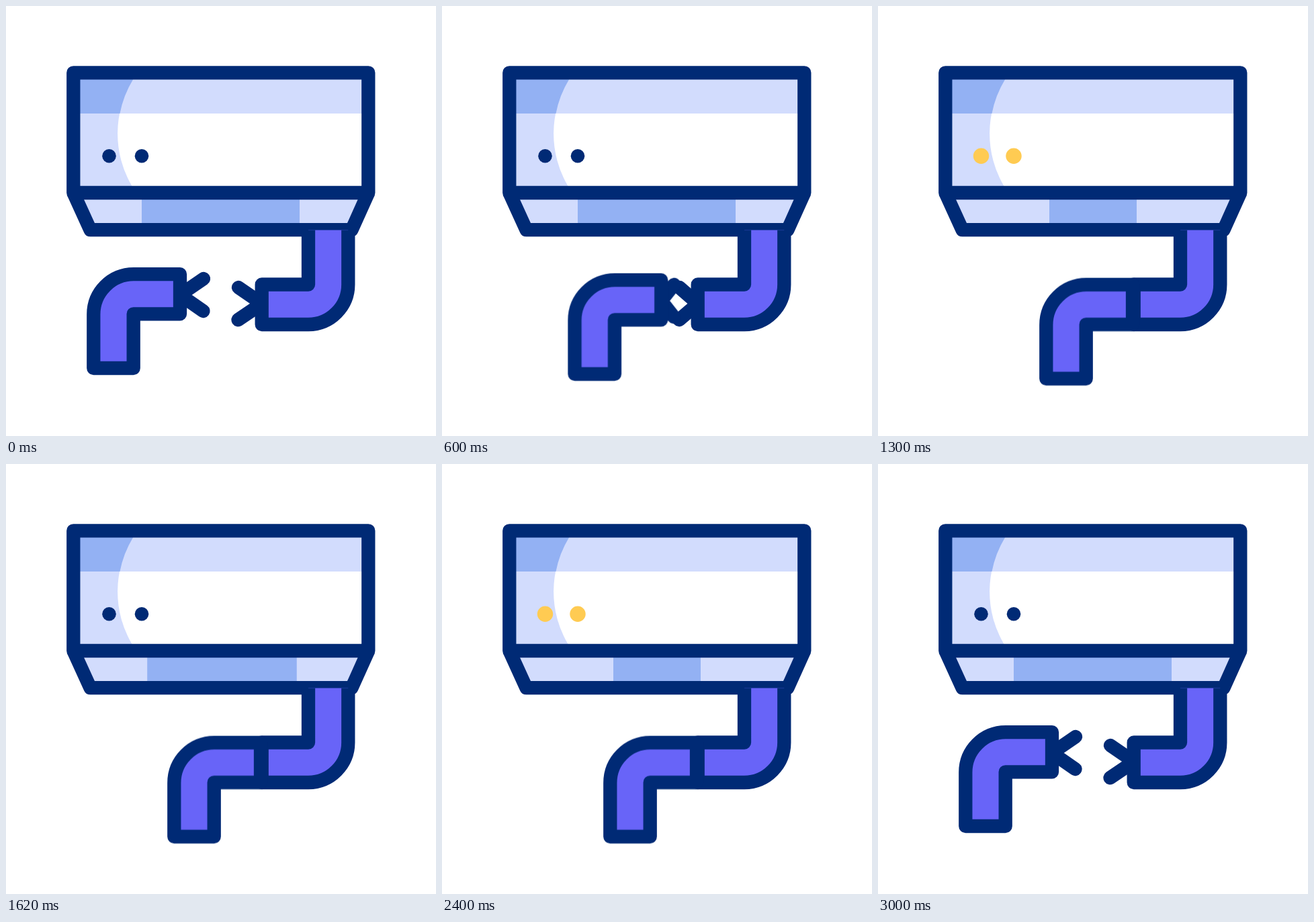
Write an HTML page that moves like this. It is 640 px wide and 640 px high and loops after 3.6 s.

```html
<!DOCTYPE html>
<html lang="en">
<head>
<meta charset="utf-8">
<title>Air conditioner pipe</title>
<style>
  :root { --navy: #002a75; --violet: #6864f8; --pale: #d2dcfd; --sky: #93b1f3; --gold: #ffcb52; }
  html, body { margin: 0; width: 100%; height: 100%; overflow: hidden; background: #fff; }
  svg { display: block; width: 100%; height: 100%; }

  .line { fill: none; stroke: var(--navy); stroke-width: 20.3; stroke-linejoin: round; }
  .pipe { fill: var(--violet); }
  .prong { stroke-linecap: round; }
  .pale { fill: var(--pale); }
  .sky { fill: var(--sky); }

  .slide, .drop, .prong, .vent, .lamp, .spark { animation: 3600ms linear infinite; }

  /* Loose pipe: eased sideways, a quick drop, then a straight even return */
  .slide { animation-name: slide; }
  .drop { animation-name: drop; }
  @keyframes slide {
    0%, 8.06% { transform: translateX(0); }
    8.06% { animation-timing-function: cubic-bezier(.333, 0, .667, 1); }
    23.47%, 73.89% { transform: translateX(120px); }
    83.33%, 100% { transform: translateX(0); }
  }
  @keyframes drop {
    0%, 8.06% { transform: translateY(0); }
    8.06% { animation-timing-function: cubic-bezier(.3, .7, .3, 1); }
    23.47%, 73.89% { transform: translateY(15.6px); }
    83.33%, 100% { transform: translateY(0); }
  }

  /* Prongs flatten into the pipe ends */
  .prong.left { animation-name: prong-left; }
  .prong.right { animation-name: prong-right; }
  @keyframes prong-left {
    0%, 12.78% { d: path("M294 406L259 430L293.5 454"); }
    21.39%, 73.89% { d: path("M259 406L259 430L259 454"); }
    83.33%, 100% { d: path("M294 406L259 430L293.5 454"); }
  }
  @keyframes prong-right {
    0%, 15% { d: path("M346 419L381 443L345.5 467"); }
    23%, 73.89% { d: path("M381 419L381 443L381 467"); }
    83.33%, 100% { d: path("M346 419L381 443L345.5 467"); }
  }

  .vent { animation-name: vent; animation-timing-function: cubic-bezier(.333, 0, .667, 1); }
  @keyframes vent {
    0%, 22.2% { x: 202px; width: 235px; }
    26.4%, 38.33% { x: 255px; width: 130px; }
    45.56%, 47.2% { x: 209.5px; width: 224px; }
    55.56%, 67.8% { x: 255px; width: 130px; }
    73.3%, 100% { x: 202px; width: 235px; }
  }

  .lamp { fill: var(--navy); animation-name: lamp; animation-timing-function: step-end; }
  @keyframes lamp {
    0%, 41.7%, 67.6%, 100% { fill: var(--navy); r: 10.3px; }
    28.7%, 54.6% { fill: var(--gold); r: 11.7px; }
  }

  .spark {
    stroke: var(--gold); stroke-width: 21.5; stroke-linecap: round;
    stroke-dasharray: 100 200; opacity: 0;
    animation-name: spark; animation-delay: var(--late, 0ms);
  }
  @keyframes spark {
    0%, 22.49% { opacity: 0; stroke-dashoffset: 99.9; }
    22.5% { opacity: 1; stroke-dashoffset: 99.9; }
    24.3% { stroke-dashoffset: 0; }
    26.67% { stroke-dashoffset: -99.9; }
    27.2% { opacity: 1; stroke-dashoffset: -99.9; }
    27.21%, 100% { opacity: 0; stroke-dashoffset: -99.9; }
  }
</style>
</head>
<body>
<svg viewBox="0 0 640 640">
  <clipPath id="flap"><path d="M100.3 278L125.5 333.2H514.5L539.3 278Z"/></clipPath>

  <!-- Body -->
  <path class="pale" d="M100 99H539V160H100Z"/>
  <path class="pale" d="M100 99V278H193L187.5 268A153 153 0 0 1 189 109.5L195 99Z"/>
  <path class="sky" d="M100 99V160H169.5A153 153 0 0 1 189 109.5L195 99Z"/>
  <circle class="lamp" cx="153.5" cy="223.3" r="10.3"/>
  <circle class="lamp" cx="202" cy="223.3" r="10.3"/>

  <!-- Flap -->
  <g clip-path="url(#flap)">
    <rect class="pale" x="100" y="278" width="440" height="56"/>
    <rect class="vent sky" x="202" y="278" width="235" height="56"/>
  </g>
  <path class="line" d="M100.3 278L125.5 333.2H514.5L539.3 278"/>
  <path class="line" d="M100.3 99.3H539.3V278H100.3Z"/>

  <!-- Sparks -->
  <line class="spark" pathLength="100" x1="357" y1="385" x2="345.6" y2="360.5" style="--late:7ms"/>
  <line class="spark" pathLength="100" x1="397" y1="385" x2="409.7" y2="358.5" style="--late:25ms"/>
  <line class="spark" pathLength="100" x1="381" y1="497" x2="367.8" y2="524" style="--late:36ms"/>
  <line class="spark" pathLength="100" x1="412" y1="493" x2="425" y2="518.7"/>

  <!-- Fixed pipe -->
  <path class="line prong right" d="M346 419L381 443L345.5 467"/>
  <path class="line pipe" d="M450 333.5V414.5H380.7V474H450A59.5 59.5 0 0 0 509.3 414.5V333.5"/>

  <!-- Loose pipe -->
  <g class="slide"><g class="drop">
    <path class="line prong left" d="M294 406L259 430L293.5 454"/>
    <path class="line pipe" d="M130.3 539V459A59.7 59.7 0 0 1 190 399.2H259V458.3H189.7V539Z"/>
  </g></g>
</svg>
</body>
</html>
```
